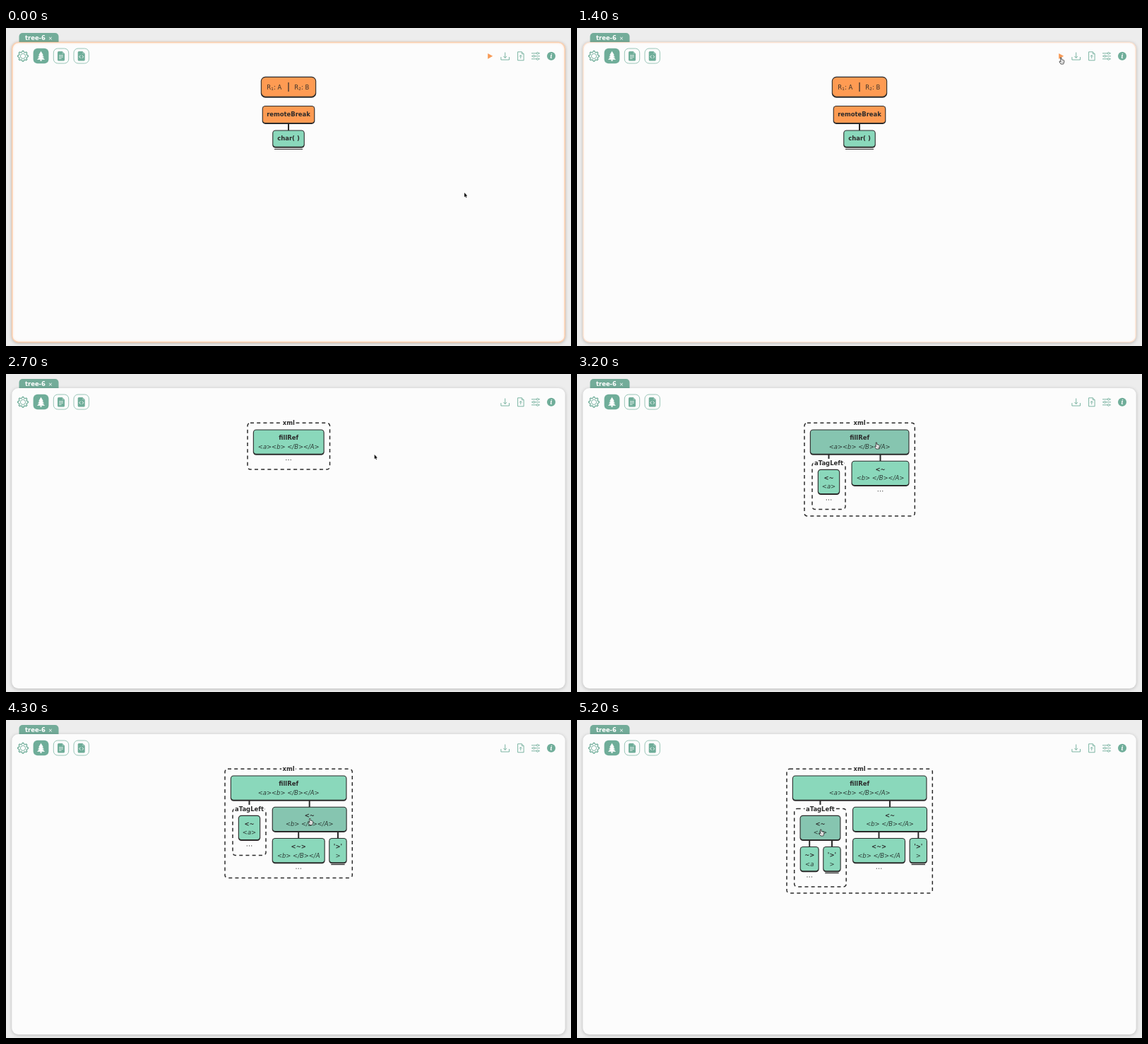
These frames come from a looping animation (800 by 450 pixels, 5.3 s). An HTML page with a canvas:

```html
<!DOCTYPE html>
<html lang="en">
<head>
<meta charset="utf-8">
<title>Parse tree viewer</title>
<style>
html, body { margin: 0; width: 100%; height: 100%; overflow: hidden; background: #ededed; }
canvas { display: block; width: 800px; height: 450px; }
</style>
</head>
<body>
<canvas id="stage"></canvas>
<script>
const LOOP = 5300, STEP = 100;
const INK = '#2b2b2b', GREEN = '#6fad99', MINT = '#8ad8bb', MINT_HOVER = [134, 197, 176];
const ORANGE = '#fe9b53', PAPER = '#fcfcfc';
const SANS = '"DejaVu Sans", sans-serif';

const canvas = document.getElementById('stage');
const ctx = canvas.getContext('2d');
const ratio = window.devicePixelRatio || 1;
canvas.width = 800 * ratio;
canvas.height = 450 * ratio;

function roundBox(x0, y0, x1, y1, r) {
  ctx.beginPath();
  ctx.roundRect(x0, y0, x1 - x0, y1 - y0, r);
}

function fillBox(x0, y0, x1, y1, r, color) {
  roundBox(x0, y0, x1, y1, r);
  ctx.fillStyle = color;
  ctx.fill();
}

function trace(points, closed) {
  ctx.beginPath();
  points.forEach(([x, y], i) => i ? ctx.lineTo(x, y) : ctx.moveTo(x, y));
  if (closed) ctx.closePath();
}

function line(points, color, width) {
  trace(points);
  ctx.strokeStyle = color;
  ctx.lineWidth = width;
  ctx.stroke();
}

function shape(points, color) {
  trace(points, true);
  ctx.fillStyle = color;
  ctx.fill();
}

function disc(x, y, r, color) {
  ctx.beginPath();
  ctx.arc(x, y, r, 0, Math.PI * 2);
  ctx.fillStyle = color;
  ctx.fill();
}

function ring(x, y, r, color, width) {
  ctx.beginPath();
  ctx.arc(x, y, r, 0, Math.PI * 2);
  ctx.strokeStyle = color;
  ctx.lineWidth = width;
  ctx.stroke();
}

function text(str, x, y, style = '', color = INK, size = 8.44, align = 'center') {
  ctx.font = `${style} ${size}px ${SANS}`;
  ctx.textAlign = align;
  ctx.fillStyle = color;
  ctx.fillText(str, x, y);
}

// ---- Tree parts ----

function block(x0, y0, x1, y1, r, color) {
  fillBox(x0 - 0.5, y0 - 0.5, x1 + 0.5, y1 + 0.7, r + 0.5, INK);
  fillBox(x0 + 0.6, y0 + 0.6, x1 - 0.6, y1 - 1.3, r - 0.6, color);
}

function mintShade(hover) {
  const base = [138, 216, 187];
  return `rgb(${base.map((c, i) => Math.round(c + (MINT_HOVER[i] - c) * hover))})`;
}

function node(x0, x1, y, title, sub, hover = 0) {
  const mid = (x0 + x1) / 2;
  block(x0, y, x1, y + 35, 4, mintShade(hover));
  text(title, mid, y + 14.3, 'bold');
  text(sub, mid, y + 27, 'italic', '#2c3c36');
}

function link(x, y0, y1) {
  line([[x, y0], [x, y1]], INK, 2);
}

function endBar(x0, x1, y) {
  line([[x0, y], [x1, y]], INK, 1.2);
}

function dots(x, y) {
  for (const d of [-3.2, 0, 3.2]) disc(x + d, y, 0.65, '#444');
}

function group(x0, y0, x1, y1, title) {
  const mid = (x0 + x1) / 2;
  roundBox(x0, y0, x1, y1, 4);
  ctx.strokeStyle = INK;
  ctx.lineWidth = 1.5;
  ctx.setLineDash([5, 4.2]);
  ctx.stroke();
  ctx.setLineDash([]);
  ctx.font = `bold 8.44px ${SANS}`;
  const half = ctx.measureText(title).width / 2 + 1.5;
  fillBox(mid - half, y0 - 5.5, mid + half, y0 + 5.5, 0, PAPER);
  text(title, mid, y0 + 3, 'bold');
}

function closeLeaf(x, y) {
  link(x + 12.3, y - 9, y);
  node(x, x + 24.5, y, "'>'", '>');
  endBar(x + 2.5, x + 22, y + 37);
}

function leftBranch(x, open, hover) {
  const w = open ? 73.5 : 47;
  const mid = x + w / 2;
  link(mid, 114, 120);
  group(x, 125.5, x + w, open ? 236 : 191.5, 'aTagLeft');
  if (open) {
    link(x + 21.5, 170, 179.5);
    closeLeaf(x + 41, 179.5);
    node(x + 8.5, x + 34.5, 179.5, '~>', '<a');
    dots(x + 21.5, 222);
  } else {
    dots(mid, 178);
  }
  node(x + 8.3, x + w - 8.3, 135.3, '<~', '<a>', hover);
}

function rightBranch(x, open, hover) {
  const w = open ? 105 : 81;
  const mid = x + w / 2;
  link(mid, 113, 123);
  if (open) {
    link(x + 37, 158, 167.5);
    closeLeaf(x + 80.5, 167.5);
    node(x, x + 74, 167.5, '<~>', '<b> </B></A');
    dots(x + 37, 210.2);
  } else {
    dots(mid, 165.7);
  }
  node(x, x + w, 123.2, '<~', '<b> </B></A>', hover);
}

function startView() {
  block(361.3, 69.3, 438.7, 98, 6, ORANGE);
  register('1', 'A', 369.3);
  register('2', 'B', 408.3);
  line([[400, 77], [400, 90]], INK, 1.2);
  link(400, 135, 145);
  block(363.2, 110.5, 436.8, 135.2, 4, ORANGE);
  text('remoteBreak', 400, 124.6, 'bold');
  block(377.7, 145, 422.3, 169, 4, MINT);
  text('char( )', 400, 159.2, 'bold');
  endBar(380, 420, 171.5);
}

function register(index, value, x) {
  text('R', x, 86.5, '', '#3a3029', 8.44, 'left');
  text(index, x + 5.9, 88.2, '', '#3a3029', 5.6, 'left');
  text(': ' + value, x + 9.6, 86.5, '', '#3a3029', 8.44, 'left');
}

// Edges of the outer group, its bottom and the branch positions per stage.
const LAYOUTS = [
  { x0: 342, x1: 458.5, bottom: 135 },
  { x0: 322, x1: 478.3, bottom: 201, left: 333, right: 389 },
  { x0: 310, x1: 490.3, bottom: 223.5, left: 321, right: 377.2 },
  { x0: 297, x1: 503.3, bottom: 245, left: 307.7, right: 390.5 }
];

function treeView(t) {
  const stage = t < 3100 ? 0 : t < 4100 ? 1 : t < 5100 ? 2 : 3;
  const { x0, x1, bottom, left, right } = LAYOUTS[stage];
  group(x0, 69.3, x1, bottom, 'xml');
  if (stage) {
    leftBranch(left, stage > 2, fade(t, 4800, 5300));
    rightBranch(right, stage > 1, fade(t, 3600, 4700));
  } else {
    dots(400, 121.5);
  }
  node(x0 + 8.3, x1 - 8.3, 79, 'fillRef', '<a><b> </B></A>', fade(t, 2900, 3400));
}

function fade(t, on, off) {
  const clamp = v => Math.min(1, Math.max(0, v));
  return clamp((t - on) / 200) * (1 - clamp((t - off) / 200));
}

// ---- Window and toolbar ----

function card(glow) {
  ctx.save();
  ctx.shadowColor = 'rgba(0,0,0,.22)';
  ctx.shadowBlur = 5 * ratio;
  ctx.shadowOffsetY = ratio;
  fillBox(8.3, 20, 791.7, 445, 9, PAPER);
  ctx.restore();
  if (glow > 0) {
    ctx.save();
    ctx.shadowColor = `rgba(254,155,83,${glow})`;
    ctx.shadowBlur = 3 * ratio;
    roundBox(8.8, 20.5, 791.2, 444.5, 9);
    ctx.strokeStyle = `rgba(254,170,110,${glow * 0.75})`;
    ctx.lineWidth = 1.5;
    ctx.stroke();
    ctx.restore();
  }
}

function tab() {
  fillBox(18.5, 7, 74.5, 21, [5, 5, 0, 0], '#73ac99');
  text('tree-6', 27, 17, 'bold', '#fff', 8.44, 'left');
  text('×', 63, 16.8, '', '#fff', 7.5);
}

function gear(x, y) {
  const points = [];
  for (let i = 0; i < 32; i++) {
    const a = (i - 0.5) * Math.PI / 16;
    const r = i % 4 < 2 ? 7.4 : 5.8;
    points.push([x + r * Math.cos(a), y + r * Math.sin(a)]);
  }
  trace(points, true);
  ctx.strokeStyle = GREEN;
  ctx.lineWidth = 1.3;
  ctx.lineJoin = 'round';
  ctx.stroke();
  ring(x, y, 3.6, GREEN, 0.9);
}

function pine(x, y) {
  for (const [top, half] of [[-7, 3.4], [-3.8, 4.5], [-0.6, 5.6]]) {
    shape([[x, y + top], [x + half, y + top + 5.6], [x - half, y + top + 5.6]], '#fff');
  }
  fillBox(x - 1, y + 4.5, x + 1, y + 7, 0, '#fff');
}

function fileButton(x, code) {
  roundBox(x - 10.7, 29, x + 10.7, 50, 6);
  ctx.strokeStyle = '#9ac6b8';
  ctx.lineWidth = 1;
  ctx.stroke();
  fillBox(x - 5, 33, x + 5, 46.5, 1.5, GREEN);
  shape([[x + 1.4, 32.8], [x + 5.2, 32.8], [x + 5.2, 36.6]], PAPER);
  shape([[x + 1.6, 33.6], [x + 4.6, 36.6], [x + 1.6, 36.6]], '#9ac6b8');
  if (code) {
    for (const s of [-1, 1]) {
      line([[x + s * 1.1, 38.7], [x + s * 3, 40.7], [x + s * 1.1, 42.7]], '#fff', 0.9);
    }
  } else {
    line([[x - 3, 38.8], [x + 3, 38.8]], '#fff', 0.8);
    line([[x - 3, 41], [x + 3, 41]], '#fff', 0.8);
    line([[x - 3, 43.2], [x + 0.5, 43.2]], '#fff', 0.8);
  }
}

function downloadIcon(x) {
  line([[x - 5.8, 41], [x - 5.8, 45], [x + 5.8, 45], [x + 5.8, 41]], GREEN, 0.9);
  line([[x, 34.5], [x, 42.3]], GREEN, 0.9);
  line([[x - 2.4, 40], [x, 42.4], [x + 2.4, 40]], GREEN, 0.9);
}

function uploadIcon(x) {
  trace([[x - 4.2, 33.8], [x + 1.5, 33.8], [x + 4.3, 36.7], [x + 4.3, 45.8], [x - 4.2, 45.8]], true);
  ctx.strokeStyle = GREEN;
  ctx.lineWidth = 0.9;
  ctx.stroke();
  line([[x + 1.5, 33.8], [x + 1.5, 36.7], [x + 4.3, 36.7]], GREEN, 0.8);
  line([[x, 43.2], [x, 38.6]], GREEN, 0.9);
  line([[x - 1.8, 40.3], [x, 38.5], [x + 1.8, 40.3]], GREEN, 0.9);
}

function slidersIcon(x) {
  for (const [y, knob] of [[35.8, 2.6], [39.8, -2.6], [43.8, 2.6]]) {
    line([[x - 6, y], [x + 6, y]], GREEN, 0.9);
    disc(x + knob, y, 1.5, PAPER);
    ring(x + knob, y, 1.4, GREEN, 0.9);
  }
}

function toolbar(showPlay) {
  gear(24, 39.8);
  fillBox(38.6, 28.8, 60.4, 50.2, 6, GREEN);
  pine(49.5, 39.8);
  fileButton(78, false);
  fileButton(106.7, true);
  if (showPlay) shape([[682.2, 35.9], [689.2, 39.8], [682.2, 43.8]], '#f79a56');
  downloadIcon(706.7);
  uploadIcon(728.8);
  slidersIcon(750);
  disc(772, 39.7, 6, GREEN);
  ctx.font = 'italic bold 9px "Noto Serif", serif';
  ctx.textAlign = 'center';
  ctx.fillStyle = '#fff';
  ctx.fillText('i', 771.9, 43);
}

// ---- Pointer: time, x, y of each rest point ----

const PATH = [
  [0, 649, 233], [200, 649, 233], [1200, 685.5, 42], [1800, 685.5, 42],
  [2400, 555, 112], [2500, 533, 116], [2600, 533, 116], [3100, 424, 97],
  [3200, 424, 97], [3800, 430.5, 139.5], [4400, 430.5, 139.5],
  [4700, 370, 155.5], [4900, 345.5, 155], [LOOP, 345.5, 155]
];

function pointerAt(t) {
  const i = PATH.findIndex(p => p[0] > t);
  const [t0, x0, y0] = PATH[i - 1], [t1, x1, y1] = PATH[i];
  const u = (t - t0) / (t1 - t0);
  const k = u * u * (3 - 2 * u);
  return [x0 + (x1 - x0) * k, y0 + (y1 - y0) * k];
}

function overButton(t) {
  return (t >= 1100 && t < 1900) || (t >= 2900 && t < 4700) || t >= 4800;
}

function pointer(t) {
  const [x, y] = pointerAt(t);
  ctx.save();
  ctx.translate(x, y);
  ctx.lineJoin = 'round';
  if (overButton(t)) {
    trace([[-0.9, 0], [0.4, 0], [0.9, 3], [3.9, 3.6], [4.3, 4.6], [3.9, 7.2], [3.2, 9],
      [-0.4, 9], [-2.4, 5.8], [-1.9, 4.9], [-0.6, 5.8]], true);
    ctx.fillStyle = '#fff';
    ctx.strokeStyle = '#222';
    ctx.lineWidth = 0.8;
    ctx.fill();
    ctx.stroke();
    for (const d of [1, 2.4]) line([[d, 5.4], [d, 7.4]], '#555', 0.5);
  } else {
    trace([[0, 0], [0, 6.2], [1.4, 5], [2.4, 7.3], [3.3, 6.9], [2.4, 4.7], [4.2, 4.6]], true);
    ctx.strokeStyle = '#fff';
    ctx.lineWidth = 1.2;
    ctx.stroke();
    ctx.fillStyle = '#111';
    ctx.fill();
  }
  ctx.restore();
}

function draw(t) {
  const running = t >= 1600;
  const glow = running ? 0 : 0.2 + 0.4 * (0.5 + 0.5 * Math.cos(t / 1000 * Math.PI));
  ctx.setTransform(ratio, 0, 0, ratio, 0, 0);
  ctx.fillStyle = '#ededed';
  ctx.fillRect(0, 0, 800, 450);
  tab();
  card(glow);
  toolbar(!running);
  if (running) treeView(t); else startView();
  pointer(t);
}

const begin = performance.now();
function tick() {
  const t = (performance.now() - begin) % LOOP;
  draw(Math.floor(t / STEP) * STEP);
  requestAnimationFrame(tick);
}
tick();
</script>
</body>
</html>
```
